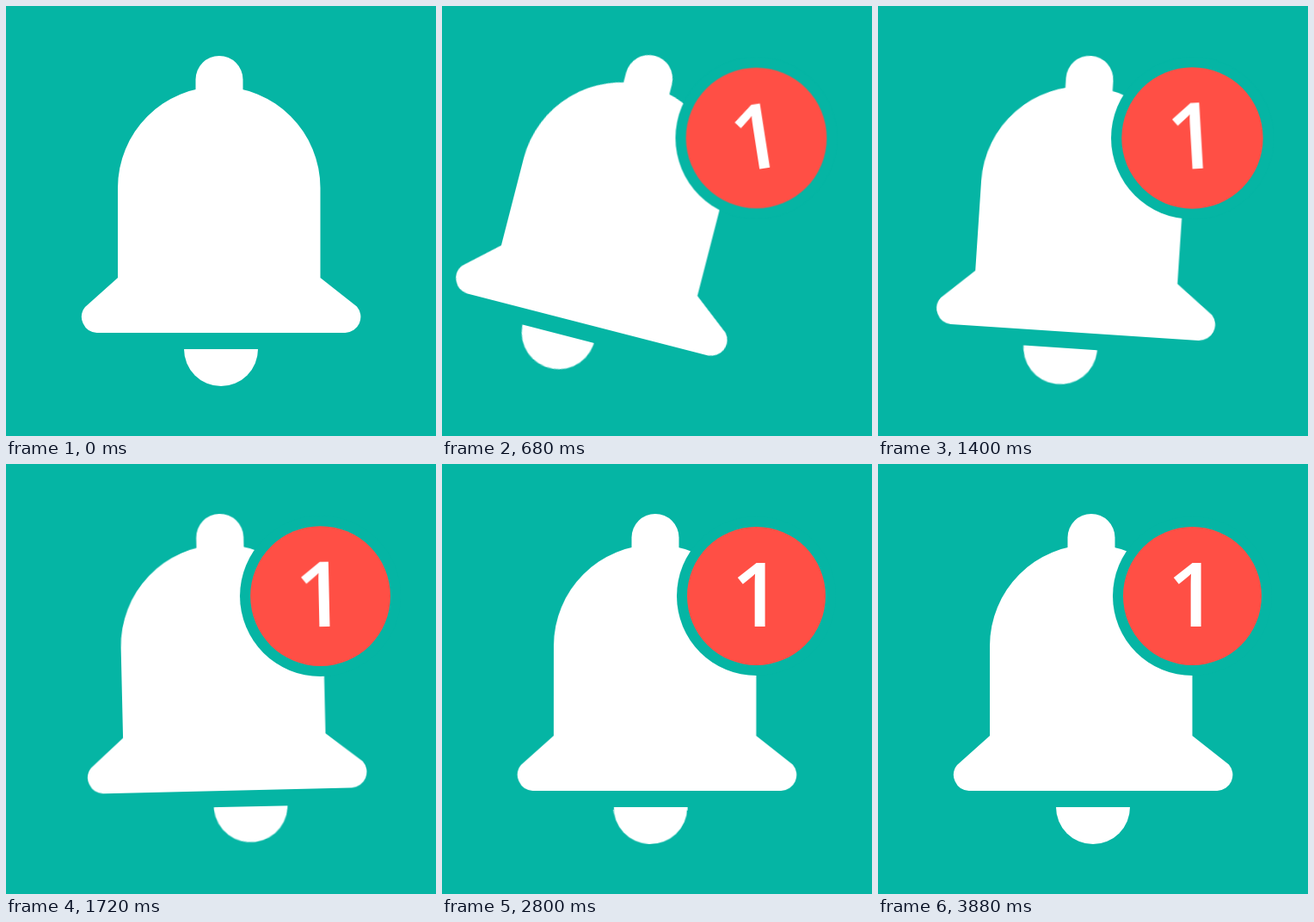
These frames come from a looping animation (500 px wide and 500 px high, 4040 ms). An HTML page:

```html
<!DOCTYPE html>
<html lang="en">
<head>
<meta charset="utf-8">
<title>Notification bell</title>
<style>
  html, body { margin: 0; width: 100%; height: 100%; overflow: hidden; background: #05b5a4; }
  svg { display: block; width: 100%; height: 100%; }
  #bell { transform-origin: 248px 56px; }
  #clapper { transform-origin: 250px 149px; }
  #badge, #count { transform-origin: 365.5px 153.5px; }
  text { font: 600 104px "Open Sans", "Noto Sans", sans-serif; text-anchor: middle; }
</style>
</head>
<body>
<svg viewBox="0 0 500 500" fill="#fff">
  <clipPath id="below"><rect x="-100" y="399" width="700" height="200"/></clipPath>
  <g id="bell">
    <path d="M220.5 110V85.5a27.5 27.5 0 0 1 55 0V110z"/>
    <path d="M130 316V211.5a117.75 117.75 0 0 1 235.5 0V316L408 349.5A18.5 18.5 0 0 1 394.5 380H105.5A18.5 18.5 0 0 1 92 350z"/>
    <g clip-path="url(#below)">
      <circle id="clapper" cx="250" cy="399" r="43"/>
    </g>
  </g>
  <g id="badge">
    <circle cx="365.5" cy="153.5" r="92.5" fill="#05b5a4"/>
    <circle cx="365.5" cy="153.5" r="80.5" fill="#ff4f45"/>
    <text id="count" x="365.7" y="189">1</text>
  </g>
</svg>
<script>
  const LOOP = 4040, STEP = 40, REST = 3880;
  const { PI, sin, cos, exp, min, max } = Math;

  // Smooth 0 to 1 between two times.
  function ramp(t, from, to) {
    const x = min(1, max(0, (t - from) / (to - from)));
    return x * x * (3 - 2 * x);
  }

  // Swings out to the right, then oscillates and dies away.
  function bellAngle(t) {
    const size = 25 * ramp(t, 0, 354) * exp(-((t / 1000) ** 1.8));
    return -size * cos(PI * max(0, t - 354) / 362);
  }

  // Lags behind the bell and settles later.
  function clapperAngle(t) {
    const size = 27.4 * max(0, 1 - t / REST) ** 1.5;
    return size * ramp(t, 0, 440) * sin(PI * max(0, t - 364) / 355);
  }

  // Pops up slightly too large, then relaxes.
  function badgeScale(t) {
    const grown = 1 - exp(-((max(0, t - STEP) / 208) ** 1.5));
    return 1.021 * grown - .021 * ramp(t, 1400, 2080);
  }

  const countAngle = t => -11 * (1 - ramp(t, 100, 2150));

  const rotate = deg => `rotate(${deg.toFixed(3)}deg)`;
  const scale = k => `scale(${k.toFixed(4)})`;

  function play(id, toTransform, valueAt) {
    const frames = Array.from({ length: LOOP / STEP + 1 }, (_, i) => ({
      transform: toTransform(valueAt(i * STEP)),
      easing: 'step-end'
    }));
    document.getElementById(id).animate(frames, { duration: LOOP, iterations: Infinity });
  }

  play('bell', rotate, t => t < STEP ? 0 : bellAngle(t));
  play('clapper', rotate, clapperAngle);
  play('badge', scale, badgeScale);
  play('count', rotate, countAngle);
</script>
</body>
</html>
```
